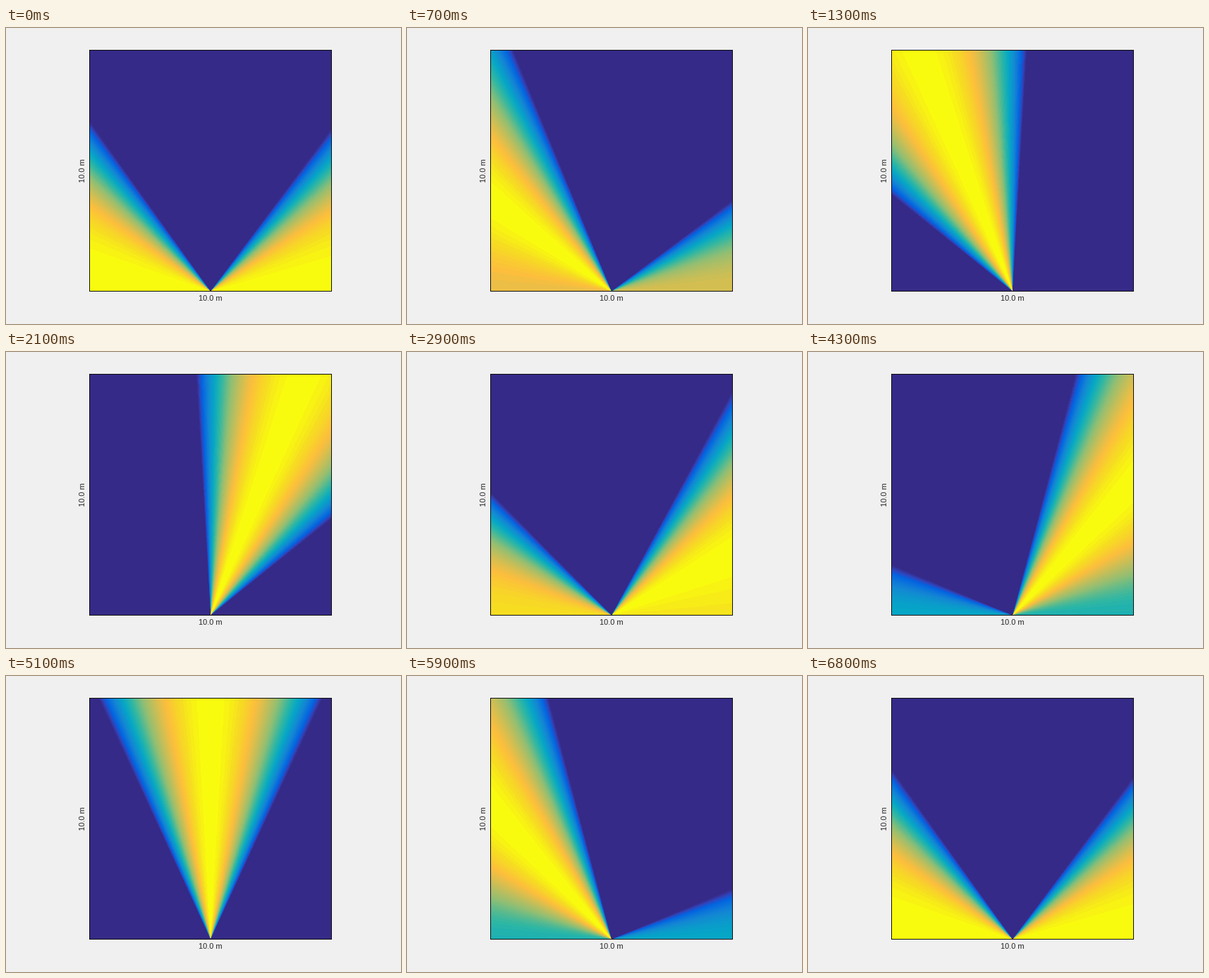
A matplotlib script that plays this animation: 560 by 420 pixels, repeating every 6.9 s.

```python
import numpy as np
import matplotlib.pyplot as plt
from matplotlib.animation import FuncAnimation
from matplotlib.colors import LinearSegmentedColormap
from matplotlib.patches import Rectangle

W, H, DPI = 560, 420, 100
FRAMES, STEP_MS = 69, 100
X0, X1, Y0, Y1 = 119, 461, 32, 373   # heat map, in pixels
LEVELS = 64

# Key colours from indigo through teal and orange to yellow
cmap = LinearSegmentedColormap.from_list("beam", [
    (0, "#352a87"), (0.063, "#3243ba"), (0.127, "#0363e1"),
    (0.254, "#1485d4"), (0.381, "#06a7c6"), (0.492, "#2eb7a4"),
    (0.635, "#92bf73"), (0.841, "#fdbe3d"), (0.937, "#f6de21"),
    (1, "#f9fb0e"),
], N=LEVELS)

# Three-element line array, steered over +-90 degrees
PITCH = 0.17 * 1000 / 343            # element spacing in wavelengths
RANGE_DB = 6
px, py = np.meshgrid(np.arange(X0, X1) + 0.5, np.arange(Y0, Y1) + 0.5)
dx, dy = px - 290, 373.5 - py
sin_dir = dx / np.hypot(dx, dy)


def beam(i):
    """Directivity in dB, scaled to colour levels, for one steering angle."""
    steer = -np.cos(2 * np.pi * i / (FRAMES - 1))
    phase = 2 * np.pi * PITCH * (sin_dir - steer)
    gain = np.abs(1 + 2 * np.cos(phase)) / 3
    db = 20 * np.log10(np.maximum(gain, 1e-6))
    level = np.floor((1 + db / RANGE_DB) * LEVELS)
    return np.clip(level, 0, LEVELS - 1)


fig = plt.figure(figsize=(W / DPI, H / DPI), dpi=DPI, facecolor="#f0f0f0")
ax = fig.add_axes([0, 0, 1, 1])

# A dark backing one pixel larger than the map forms its border
ax.add_patch(Rectangle((X0 - 1, Y0 - 1), X1 - X0 + 2, Y1 - Y0 + 2,
                       fc="#0f0f0f", lw=0, antialiased=False, zorder=1))
image = ax.imshow(beam(0), cmap=cmap, vmin=-0.5, vmax=LEVELS - 0.5,
                  extent=(X0, X1, Y1, Y0), interpolation="nearest",
                  aspect="auto", zorder=2)
ax.set_xlim(0, W)
ax.set_ylim(H, 0)
ax.axis("off")

label = dict(family="Liberation Sans", size=11 * 72 / DPI, color="#262626",
             ha="center", va="baseline", rotation_mode="anchor")
ax.text(290, 387, "10.0 m", **label)
ax.text(112, 202.5, "10.0 m", rotation=90, **label)


def update(i):
    image.set_data(beam(i))
    return (image,)


anim = FuncAnimation(fig, update, frames=FRAMES, interval=STEP_MS,
                     repeat=True, repeat_delay=0)
plt.show()
```
